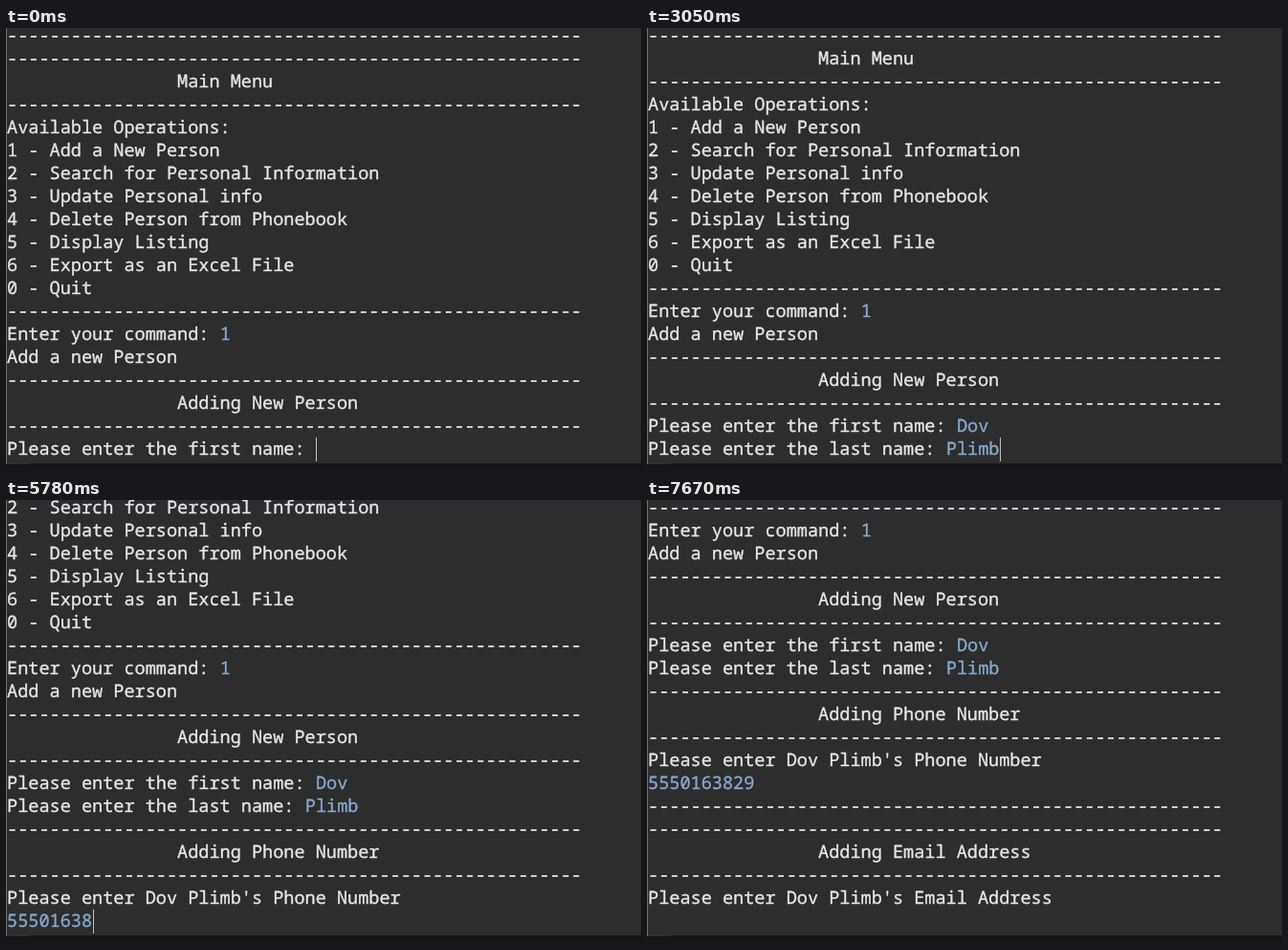
Animation of 664x464 px, one loop 8 s. Source, as an HTML page with a canvas:

```html
<!DOCTYPE html>
<html lang="en">
<head>
<meta charset="utf-8">
<title>Phonebook terminal</title>
<style>
html, body { margin: 0; width: 100%; height: 100%; overflow: hidden; background: #2d2d2d; }
canvas { display: block; }
</style>
</head>
<body>
<canvas id="stage" width="664" height="464"></canvas>
<script>
const ctx = document.getElementById('stage').getContext('2d');
const LOOP = 8000, ROW = 24, TOP = -4, LEFT = 1, SIZE = 18.56, CELL = SIZE * 0.6;

const first = 'Dov', last = 'Plimb', phone = '5550163829';
const rule = '-'.repeat(54);
const heading = text => [rule, ' '.repeat(16) + text, rule];

const lines = [
  rule, ...heading('Main Menu'),
  'Available Operations:',
  '1 - Add a New Person',
  '2 - Search for Personal Information',
  '3 - Update Personal info',
  '4 - Delete Person from Phonebook',
  '5 - Display Listing',
  '6 - Export as an Excel File',
  '0 - Quit',
  rule,
  'Enter your command: ',
  'Add a new Person',
  ...heading('Adding New Person'),
  'Please enter the first name: ',
  'Please enter the last name: ',
  ...heading('Adding Phone Number'),
  `Please enter ${first} ${last}'s Phone Number`,
  '',
  rule, ...heading('Adding Email Address'),
  `Please enter ${first} ${last}'s Email Address`
];

// Typed text by row, with the time of each key
const inputs = {
  13: { text: '1', keys: [0] },
  18: { text: first, keys: [1240, 1240, 1390] },
  19: { text: last, keys: [2410, 2690, 2810, 2930, 3050] },
  24: { text: phone, keys: [4440, 4560, 4710, 4710, 5080, 5360, 5490, 5780, 6060, 6360] }
};

// row, col: where the cursor waits until something is typed into the field row
const phases = [
  { start: 0, shown: 19, scroll: 0, row: 18, col: 29, field: 18 },
  { start: 2130, shown: 20, scroll: 24, row: 19, col: 0, field: 19 },
  { start: 3330, shown: 25, scroll: 144, row: 20, col: 0, field: 24 },
  { start: 7020, shown: 25, scroll: 165, row: 25, col: 0 },
  { start: 7140, shown: 30, scroll: 288, row: 25, col: 0 }
];

const cursorOn = [[0, 530], [1090, 1980], [2130, 3910], [4440, 6890], [7020, 7670]];

function typed(row, t) {
  const input = inputs[row];
  return input ? input.text.slice(0, input.keys.filter(k => k <= t).length) : '';
}

function box(color, x, y, w, h) {
  ctx.fillStyle = color;
  ctx.fillRect(x, y, w, h);
}

// A hairline outline gives the text its slightly heavy weight
function write(text, col, y, color) {
  const x = LEFT + col * CELL;
  ctx.fillStyle = ctx.strokeStyle = color;
  ctx.fillText(text, x, y);
  ctx.strokeText(text, x, y);
}

function draw(t) {
  const phase = phases.findLast(p => p.start <= t);
  const rowTop = row => TOP + row * ROW - phase.scroll;

  box('#2d2d2d', 0, 0, 664, 464);
  ctx.font = `${SIZE}px "Noto Sans Mono", "DejaVu Sans Mono", monospace`;
  ctx.textRendering = 'geometricPrecision';
  ctx.lineWidth = 0.35;
  ctx.lineJoin = 'round';

  lines.slice(0, phase.shown).forEach((line, row) => {
    const y = rowTop(row) + 18;
    write(line, 0, y, '#e6e6e6');
    write(typed(row, t), line.length, y, '#86a8cc');
  });

  if (cursorOn.some(([from, to]) => t >= from && t < to)) {
    const count = typed(phase.field, t).length;
    const row = count ? phase.field : phase.row;
    const col = count ? lines[row].length + count : phase.col;
    box('#c0c0c0', col ? Math.floor(col * CELL) + 2 : 1, rowTop(row), 1, 25);
  }

  // Window edges
  box('#707070', 0, 0, 1, 456);
  box('#161617', 0, 456, 664, 8);
  box('#161617', 24, 455, 640, 1);
}

const origin = performance.now();
function frame() {
  draw((performance.now() - origin) % LOOP);
  requestAnimationFrame(frame);
}
frame();
</script>
</body>
</html>
```
